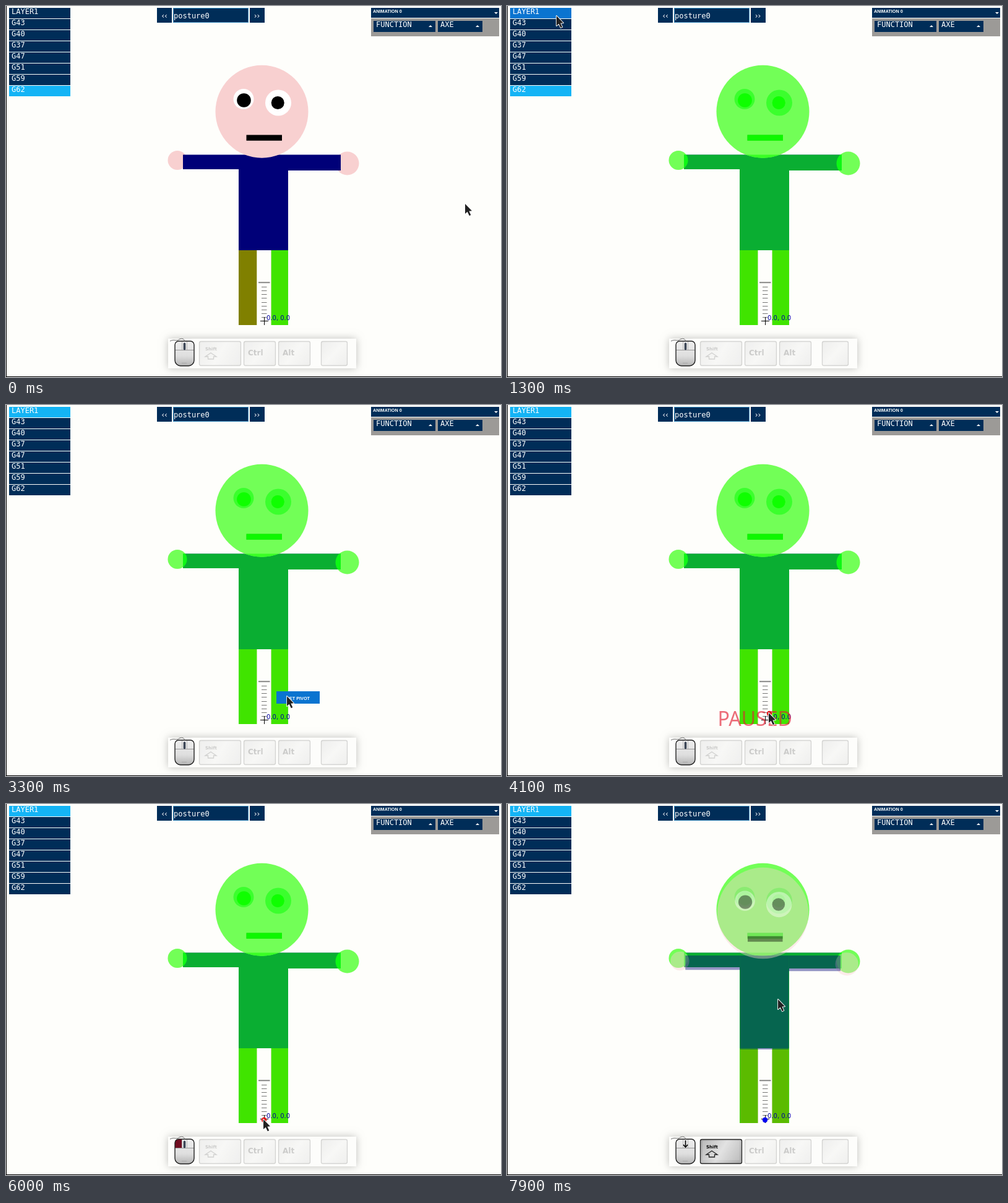
An HTML page with a canvas for the animation above (8000 ms loop, 800 by 600 pixels).

```html
<!DOCTYPE html>
<html lang="en">
<head>
<meta charset="utf-8">
<title>Posture editor</title>
<style>
html, body { margin: 0; width: 100%; height: 100%; overflow: hidden; background: #fefefb; }
canvas { display: block; }
</style>
</head>
<body>
<canvas id="stage" width="800" height="600"></canvas>
<script>
const ctx = document.getElementById('stage').getContext('2d');
const LOOP = 8000, STEP = 100;
const NAVY = '#002d58', HOVER = '#0a74d0', SELECTED = '#14b4f5';
const MONO = '12px "DejaVu Sans Mono", monospace';
const SANS = '12px "DejaVu Sans", sans-serif';
const TINY = 'bold 7.3px "Liberation Sans", sans-serif';
const LAYERS = ['LAYER1', 'G43', 'G40', 'G37', 'G47', 'G51', 'G59', 'G62'];
const PIVOT = { x: 417, y: 511 };

// eased pointer moves between rests
const HOME = { x: 742, y: 320 };
const MOVES = [
  { from: 300, to: 500, x: 458, y: 223 },
  { from: 600, to: 1000, x: 92, y: 28 },
  { from: 1100, to: 1300, x: 80, y: 16 },
  { from: 1600, to: 1800, x: 166, y: 88 },
  { from: 1900, to: 2300, x: 437, y: 463 },
  { from: 3000, to: 3300, x: 454, y: 471 },
  { from: 3500, to: 4100, x: 423, y: 498 },
  { from: 4200, to: 4900, x: 417, y: 505 },
  { from: 5100, to: 6000, x: 416, y: 510 },
  { from: 6400, to: 7000, x: 118, y: 75 },
  { from: 7000, to: 7400, x: 423, y: 286 },
  { from: 7400, to: 7700, x: 438, y: 316 }
];

function box(x, y, w, h) { const p = new Path2D(); p.rect(x, y, w, h); return p; }
function disc(x, y, r) { const p = new Path2D(); p.arc(x, y, r, 0, 7); return p; }

const SKIN = '#f8d0d0', CLOTH = '#000078', TROUSERS = '#808000';
const LEFT_LEG = box(376, 395, 29.3, 121), RIGHT_LEG = box(428.7, 395, 27.3, 121);
const FIGURE = [
  [LEFT_LEG, TROUSERS], [RIGHT_LEG, TROUSERS],
  [disc(277, 249.5, 15.5), SKIN], [disc(551.5, 254.5, 19), SKIN],
  [box(286, 240.5, 90, 23.5), CLOTH], [box(456, 240.5, 85, 25.5), CLOTH],
  [box(376, 240.5, 80, 154.5), CLOTH],
  [disc(413.5, 170.8, 75), SKIN],
  [disc(384, 150.5, 16.5), '#fff'], [disc(440, 156.5, 21), '#fff'],
  [disc(384.5, 152.5, 11.3), '#000'], [disc(439.2, 156.5, 10.5), '#000'],
  [box(388.5, 208.5, 57.5, 9.3), '#000']
];
const ARROW = new Path2D('M0 0V16L3.7 12.8L6.8 19.2L9.3 18L6.4 11.8L11 11.3Z');

const within = (t, from, to) => t >= from && t < to;
const smooth = u => u * u * (3 - 2 * u);

function pointerAt(t) {
  let { x, y } = HOME;
  for (const move of MOVES) {
    const k = smooth(Math.min(1, Math.max(0, (t - move.from) / (move.to - move.from))));
    x += (move.x - x) * k;
    y += (move.y - y) * k;
  }
  return { x, y };
}

function rect(color, x, y, w, h) { ctx.fillStyle = color; ctx.fillRect(x, y, w, h); }

function text(str, x, y, font, color, align = 'left') {
  ctx.font = font;
  ctx.fillStyle = color;
  ctx.textAlign = align;
  ctx.fillText(str, x, y);
}

function line(color, width, ...pts) {
  ctx.strokeStyle = color;
  ctx.lineWidth = width;
  ctx.beginPath();
  for (let i = 0; i < pts.length; i += 2) ctx.lineTo(pts[i], pts[i + 1]);
  ctx.stroke();
}

function triangle(x, y, dir) {
  ctx.fillStyle = '#fff';
  ctx.beginPath();
  ctx.moveTo(x - 3, y);
  ctx.lineTo(x + 3, y);
  ctx.lineTo(x, y + 3 * dir);
  ctx.fill();
}

// green veil: dims what lies below, then adds green light
function veil(path) {
  ctx.fillStyle = 'rgba(0,0,0,.58)';
  ctx.fill(path);
  ctx.globalCompositeOperation = 'lighter';
  ctx.fillStyle = 'rgb(10,174,0)';
  ctx.fill(path);
  ctx.globalCompositeOperation = 'source-over';
}

function drawShapes() {
  for (const [path, color] of FIGURE) { ctx.fillStyle = color; ctx.fill(path); }
}

function drawFigure(t, hover) {
  drawShapes();
  if (t >= 1400 || hover === 0) FIGURE.forEach(([path]) => veil(path));
  else {
    veil(RIGHT_LEG);
    if (hover === 1) veil(LEFT_LEG);
  }
  if (t >= 7900) {
    ctx.save();
    ctx.globalAlpha = .42;
    ctx.translate(PIVOT.x, PIVOT.y);
    ctx.scale(.983, .983);
    ctx.translate(-PIVOT.x, -PIVOT.y);
    drawShapes();
    ctx.restore();
  }
}

function drawRuler(t, pointer) {
  line('#888', 2, 408, 447.2, 426.5, 447.2);
  for (let i = 1; i < 10; i++) {
    const y = Math.round(447.5 + i * 6.2) + .5;
    line('#777', 1, 413, y, 421.5, y);
  }
  line('#000', 1, 411, 509.5, 424, 509.5);
  line('#000', 1, 417.5, 503, 417.5, 516);
  text('0.0, 0.0', 421, 508, '10px "DejaVu Sans", sans-serif', '#0000a0');
  if (t >= 3600) {
    const placed = t >= 6100;
    ctx.fillStyle = placed ? '#0000f0' : '#e01010';
    ctx.fill(placed ? disc(PIVOT.x, PIVOT.y, 4.2) : disc(pointer.x + 1, pointer.y + 1, 4.2));
  }
}

function drawPanels(t, hover) {
  const selected = t >= 1400 ? 0 : 7;
  LAYERS.forEach((name, i) => {
    const y = 3 + 18 * i;
    rect(i === selected ? SELECTED : i === hover ? HOVER : NAVY, 5, y, 99, 17);
    text(name, 9, y + 10, MONO, '#fff');
  });

  rect(NAVY, 244, 3, 24, 24);
  rect(NAVY, 394, 3, 24, 24);
  rect(NAVY, 270, 3, 122, 24);
  ctx.strokeStyle = '#3c8fc0';
  ctx.lineWidth = 1;
  ctx.strokeRect(270.5, 3.5, 121, 23);
  text('‹‹', 256, 20, SANS, '#fff', 'center');
  text('››', 405.5, 20, SANS, '#fff', 'center');
  text('posture0', 271, 20, MONO, '#fff');

  rect(NAVY, 590, 3, 207, 16);
  text('ANIMATION 0', 593, 10.5, TINY, '#fff');
  triangle(792, 10, 1);
  rect('#9c9a97', 590, 20, 207, 29);
  rect(NAVY, 594, 24, 100, 18);
  rect(NAVY, 698, 24, 72, 18);
  text('FUNCTION', 598, 34, MONO, '#fff');
  text('AXE', 702, 34, MONO, '#fff');
  triangle(686, 34, -1);
  triangle(762, 34, -1);
}

function drawKey(x, w, label, pressed) {
  ctx.save();
  ctx.globalAlpha = pressed ? 1 : .17;
  const shade = ctx.createLinearGradient(x, 542, x + w, 582);
  shade.addColorStop(0, '#a4a4a4');
  shade.addColorStop(.5, '#dcdcdc');
  shade.addColorStop(1, '#a8a8a8');
  ctx.fillStyle = shade;
  ctx.strokeStyle = '#222';
  ctx.lineWidth = 1.3;
  ctx.beginPath();
  ctx.roundRect(x + .5, 542.5, w - 1, 39, 2.5);
  ctx.fill();
  ctx.stroke();
  rect('rgba(255,255,255,.18)', x + 4, 545, w - 8, 31);
  if (label === 'Shift') {
    text(label, x + 10, 557, 'bold 7px "DejaVu Sans", sans-serif', '#000');
    ctx.stroke(new Path2D('M331 561L340 567H335.5V571H326.5V567H322Z'));
  } else text(label, x + 7, 565, 'bold ' + SANS, '#000');
  ctx.restore();
}

function drawMouse(t) {
  const left = within(t, 1400, 1700) || within(t, 3400, 3600) || within(t, 6000, 6300);
  const right = within(t, 2800, 2900);
  const shape = new Path2D();
  shape.roundRect(273, 542, 31, 40, [6, 6, 9, 9]);
  const shade = ctx.createLinearGradient(0, 542, 0, 582);
  shade.addColorStop(0, '#eee');
  shade.addColorStop(.6, '#dedede');
  shade.addColorStop(1, '#b4b4b4');
  ctx.fillStyle = shade;
  ctx.fill(shape);
  ctx.save();
  ctx.clip(shape);
  if (left) rect('#700c20', 273, 542, 12, 14);
  if (right) rect('#700c20', 292, 542, 12, 14);
  line('#999', 1, 273, 556.5, 304, 556.5);
  line('#bbb', 1, 284.5, 542, 284.5, 556);
  line('#bbb', 1, 292.5, 542, 292.5, 556);
  line('#aaa', 1, 284, 577.5, 292, 577.5);
  ctx.restore();
  ctx.strokeStyle = '#222';
  ctx.lineWidth = 1.4;
  ctx.stroke(shape);
  if (t >= 7900) {
    line('#000', 1.6, 288.5, 544, 288.5, 555);
    line('#000', 1.6, 285, 551, 288.5, 555, 292, 551);
  } else {
    ctx.fillStyle = '#3c4656';
    ctx.beginPath();
    ctx.roundRect(286.7, 544.5, 3.6, 12, 1.8);
    ctx.fill();
  }
  ctx.strokeStyle = '#666';
  ctx.lineWidth = 1;
  ctx.stroke(new Path2D('M265 542C272 538 276 543 280 539Q288 536 289 543'));
}

function drawKeyboard(t) {
  ctx.save();
  ctx.shadowColor = 'rgba(0,0,0,.25)';
  ctx.shadowBlur = 12;
  rect('#fdfdfb', 262, 538, 304, 48);
  ctx.restore();
  drawMouse(t);
  drawKey(312, 68, 'Shift', t >= 7700);
  drawKey(384, 52, 'Ctrl');
  drawKey(440, 52, 'Alt');
  drawKey(509, 43, '');
}

function drawPointer({ x, y }) {
  ctx.save();
  ctx.translate(x, y);
  ctx.lineJoin = 'round';
  ctx.strokeStyle = '#fff';
  ctx.lineWidth = 1.8;
  ctx.stroke(ARROW);
  ctx.fillStyle = '#222';
  ctx.fill(ARROW);
  ctx.restore();
}

function draw(t) {
  const pointer = pointerAt(t);
  const overList = pointer.x < 104 && pointer.y < 146;
  const hover = overList ? Math.floor((pointer.y - 2) / 18) : -1;

  rect('#fefefb', 0, 0, 800, 600);
  drawFigure(t, hover);
  drawRuler(t, pointer);
  drawPanels(t, hover);
  if (within(t, 2900, 3600)) {
    rect(t < 3100 ? NAVY : HOVER, 437, 463, 70, 20);
    text('SET PIVOT', 472, 476.5, TINY, '#fff', 'center');
  }
  if (within(t, 4000, 5800) && (t - 4000) % 1200 < 600)
    text('PAUSED', 340.5, 519, '32px "Noto Sans", sans-serif', 'rgba(226,30,50,.65)');
  drawKeyboard(t);
  rect('#000', 0, 0, 1, 600);
  rect('#000', 0, 599, 800, 1);
  drawPointer(pointer);
}

const start = performance.now();
function tick() {
  const t = (performance.now() - start) % LOOP;
  draw(Math.floor(t / STEP) * STEP);
  requestAnimationFrame(tick);
}
tick();
</script>
</body>
</html>
```
